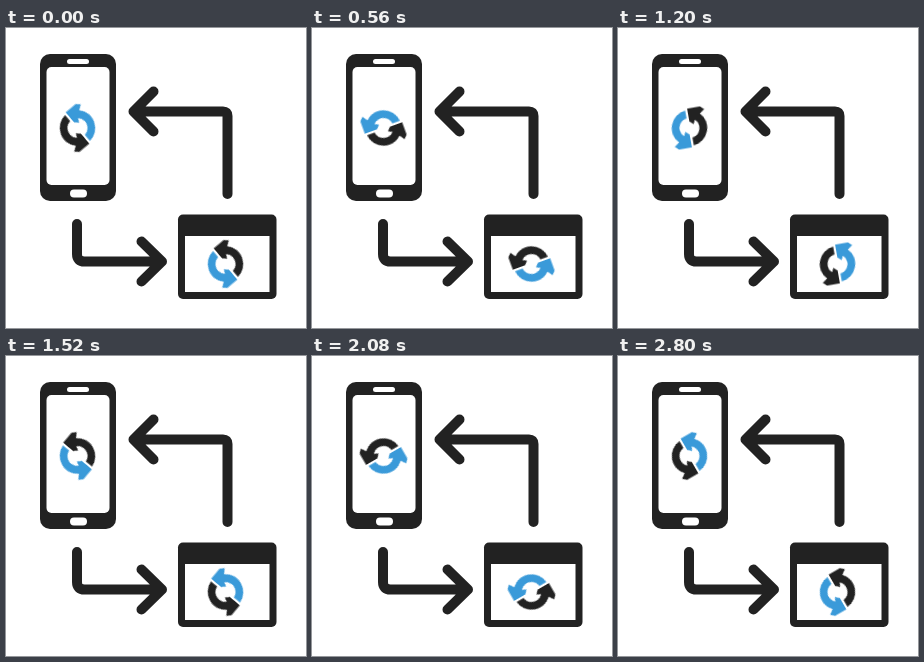
An HTML page for the animation above (2880 ms loop, 300x300 px).

```html
<!DOCTYPE html>
<html lang="en">
<head>
<meta charset="utf-8">
<title>Device sync</title>
<style>
  html, body { margin: 0; width: 100%; height: 100%; overflow: hidden; background: #fff; }
  svg { display: block; width: 100vw; height: 100vh; }
  .dark { fill: #222; }
  .blue { fill: #3a9ad9; }
  .white { fill: #fff; }
  .line { fill: none; stroke: #222; stroke-width: 10; stroke-linecap: round; stroke-linejoin: round; }
  .spin { transform-origin: 0 0; animation: spin 2880ms steps(36, end) infinite; }
  @keyframes spin { to { transform: rotate(-360deg); } }
</style>
</head>
<body>
<svg viewBox="0 0 300 300">
  <defs>
    <path id="half" d="M-17.9 1.2A18 18 0 0 0 12.5 12.8L16 17.7L19.5 14V1H6.5L3 4.7L7.3 6.8A10 10 0 0 1 -9.9 1.2Z"/>
    <g id="sync">
      <use href="#half" class="blue"/>
      <use href="#half" class="dark" transform="rotate(180)"/>
    </g>
  </defs>

  <!-- phone -->
  <rect class="dark" x="34" y="26" width="76" height="147" rx="10"/>
  <rect class="white" x="40.5" y="39" width="63" height="118" rx="5"/>
  <rect class="white" x="61" y="31" width="22" height="5" rx="2.5"/>
  <rect class="white" x="64" y="161.5" width="17" height="8" rx="4"/>

  <!-- browser window -->
  <rect class="dark" x="172" y="186.5" width="98.5" height="84.5" rx="5"/>
  <rect class="white" x="179" y="208" width="84.5" height="56"/>

  <!-- connecting arrows -->
  <path class="line" d="M221.5 166V88Q221.5 83.5 217 83.5H128M147.5 63.5L127.5 83.5L147.5 103.5"/>
  <path class="line" d="M71 196V226Q71 233.5 78.5 233.5H155M135.5 213.5L156 233.5L135.5 253.5"/>

  <g transform="translate(71.5 100)"><g class="spin"><use href="#sync" transform="rotate(230)"/></g></g>
  <g transform="translate(219.5 236)"><g class="spin"><use href="#sync" transform="rotate(50)"/></g></g>
</svg>
</body>
</html>
```
